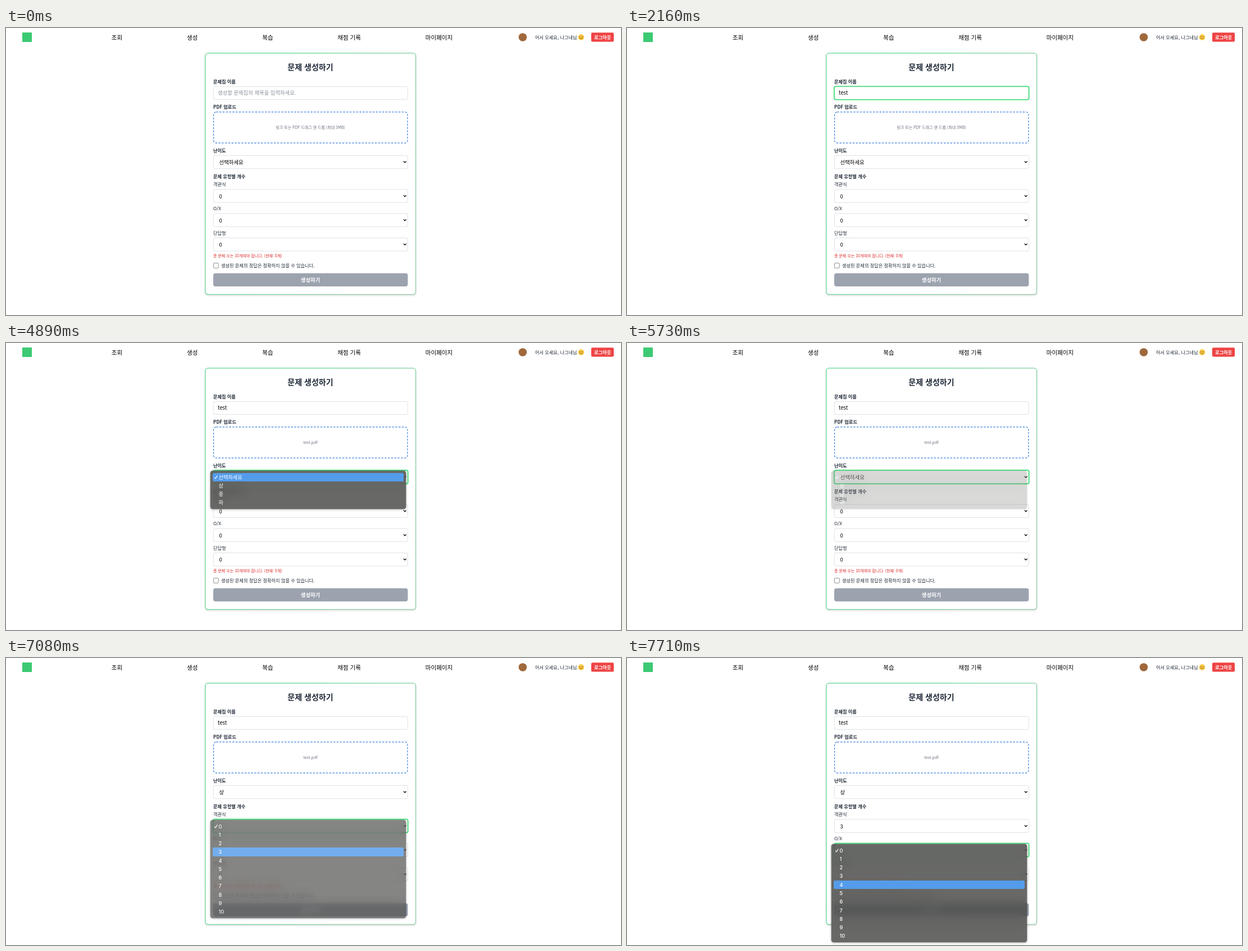
An HTML page that plays this animation: 1095x512 px, repeating every 8 s.

```html
<!DOCTYPE html>
<html lang="ko">
<head>
<meta charset="utf-8">
<title>문제 생성하기</title>
<style>
  html, body { margin: 0; width: 100%; height: 100%; overflow: hidden; background: #fff; }
  svg { position: absolute; left: 0; top: 0; }
  text { font: 8.19px "Noto Sans CJK KR", "Noto Sans CJK", sans-serif; fill: #1f2937; }
  .nav text { font-size: 10.53px; font-weight: 500; fill: #000; text-anchor: middle; }
  .title { font-size: 14.04px; font-weight: 700; text-anchor: middle; }
  .label { font-weight: 700; }
  .value { font-size: 9.36px; fill: #000; }
  .hint { font-size: 7.02px; fill: #6b7280; }
  .box { fill: #fff; stroke: #d1d5db; stroke-width: .7; }
  .ring { fill: none; stroke: #4ade80; }
  .chevron { fill: none; stroke: #000; stroke-width: 1.3; }
  #menu {
    position: absolute; left: 363.5px; width: 340px; padding: 3.5px 4px; border-radius: 4px;
    background: rgba(67, 67, 64, .8); backdrop-filter: blur(8px);
    box-shadow: 0 0 0 .5px rgba(0, 0, 0, .35), 0 1px 4px rgba(0, 0, 0, .3);
    font: 500 9.2px/15.28px Inter, "Noto Sans CJK KR", sans-serif; color: #fff;
  }
  #menu div { height: 15.28px; padding-left: 11px; border-radius: 2.5px; }
  #menu .hot { background: #549ceb; }
  #menu svg { left: 6px; top: 7px; fill: none; stroke: #fff; stroke-width: 1.1; }
</style>
</head>
<body>
<svg id="stage" width="1095" height="512" viewBox="0 0 1095 512">
  <defs>
    <linearGradient id="edge" x2="1" y2=".6">
      <stop offset=".3" stop-color="#5fd893"/><stop offset="1" stop-color="#93cdaa"/>
    </linearGradient>
    <filter id="shadow" x="-5%" y="-5%" width="110%" height="110%">
      <feDropShadow dx="0" dy="1.5" stdDeviation="1.5" flood-opacity=".14"/>
    </filter>
  </defs>

  <rect x="29" y="8" width="17" height="17" fill="#3cca74"/>
  <g class="nav">
    <text x="197.5" y="17" dy=".37em">조회</text>
    <text x="331.7" y="17" dy=".37em">생성</text>
    <text x="466" y="17" dy=".37em">복습</text>
    <text x="611" y="17" dy=".37em">채점 기록</text>
    <text x="771" y="17" dy=".37em">마이페이지</text>
  </g>
  <circle cx="920" cy="16.5" r="7.3" fill="#a0693c"/>
  <text x="942" y="16.7" dy=".37em">어서 오세요, 나그네님</text>
  <g fill="none" stroke="#6b4423" stroke-width=".8" stroke-linecap="round">
    <circle cx="1024" cy="16.4" r="5.3" fill="#fdcb45" stroke="none"/>
    <path d="M1020.8 15.6q1.1-1.6 2.2 0m2 0q1.1-1.6 2.2 0m-5.8 2.4q2.6 2.7 5.2 0"/>
  </g>
  <rect x="1042" y="8.2" width="40.2" height="16.4" rx="2.4" fill="#ef4444"/>
  <text class="label" x="1062.2" y="16.6" dy=".37em" text-anchor="middle" style="fill:#fff">로그아웃</text>

  <rect x="354.9" y="44.9" width="374.6" height="430.4" rx="4.7" fill="#fff" stroke="url(#edge)" stroke-width="1.3" filter="url(#shadow)"/>
  <text class="title" x="542" y="70" dy=".37em">문제 생성하기</text>

  <text class="label" x="369" y="96" dy=".37em">문제집 이름</text>
  <rect class="box" x="369.3" y="104.6" width="346" height="22.8" rx="2.6"/>
  <text class="value" id="name" x="377" y="116" dy=".37em"></text>
  <path id="caret" stroke="#000" stroke-width=".7" d="M.4 108.8v13.6"/>

  <text class="label" x="369" y="140.8" dy=".37em">PDF 업로드</text>
  <rect x="369.6" y="149.8" width="345.3" height="55.4" rx="4.5" fill="none" stroke="#3b7fe0" stroke-width="1.2" stroke-dasharray="3.5 2.3"/>
  <text class="hint" id="file" x="542" y="177.5" dy=".37em" text-anchor="middle"></text>

  <text class="label" x="369" y="218.8" dy=".37em">난이도</text>
  <text class="label" x="369" y="264.8" dy=".37em">문제 유형별 개수</text>
  <text x="369" y="279.2" dy=".37em">객관식</text>
  <text x="369" y="322.3" dy=".37em">O/X</text>
  <text x="369" y="365.6" dy=".37em">단답형</text>
  <g id="selects"></g>

  <text class="hint" id="total" x="369" y="406" dy=".37em" style="fill:#dc2626"></text>
  <rect x="369.4" y="419.4" width="8.8" height="8.8" rx="1.4" fill="#fff" stroke="#707070" stroke-width=".8"/>
  <text x="383" y="424.4" dy=".37em">생성된 문제의 정답은 정확하지 않을 수 있습니다.</text>
  <rect x="369" y="437.4" width="346.4" height="23.6" rx="4" fill="#9ca3af"/>
  <text class="value" x="542" y="449.4" dy=".37em" text-anchor="middle" style="fill:#fff;font-weight:700">생성하기</text>

  <g id="rings"></g>
  <g id="ghost">
    <rect x=".5" y="0" width="11" height="12.5" rx="2" fill="#eceef0"/>
    <circle cx="6.2" cy="5" r="2" fill="#8d9fbb"/>
    <rect x="11.3" y="-.5" width="35.5" height="9.8" rx="2.6" fill="#1f6bcb"/>
    <text x="14" y="4.5" dy=".34em" style="font:500 7.4px Inter,sans-serif;fill:#fff">test.pdf</text>
  </g>
</svg>
<div id="menu"></div>

<script>
const $ = id => document.getElementById(id);
const clamp = v => Math.max(0, Math.min(1, v));
const ramp = (t, from, length) => clamp((t - from) / length);
const mix = (a, b, k) => a + (b - a) * k;

const levels = ['선택하세요', '상', '중', '하'];
const counts = [...Array(11).keys()];
const selectTops = [227.4, 288, 331, 374.4];
const selectHeight = 23.4;

// hover: [time, item] pairs; the chosen value is applied 330 ms after the click
const menus = [
  { top: 228, open: 4710, click: 5580, items: levels, hover: [[4710, 0], [5070, 2], [5340, 1], [5580, -1]] },
  { top: 289, open: 6060, click: 7020, items: counts,
    hover: [[6060, 0], [6240, 1], [6270, 2], [6300, 3], [6360, 4], [6390, 5], [6570, 4], [6810, 3]] },
  { top: 332.2, open: 7500, click: 9000, items: counts,
    hover: [[7500, 0], [7620, 1], [7650, 2], [7680, 3], [7710, 4]] }
];
const focusSpans = [
  { top: 104.6, height: 22.8, spans: [[900, 2580], [4410, 4710]] },
  { top: selectTops[0], height: selectHeight, spans: [[4710, 6060]] },
  { top: selectTops[1], height: selectHeight, spans: [[6060, 7500]] },
  { top: selectTops[2], height: selectHeight, spans: [[7500, 9000]] }
];

$('selects').innerHTML = selectTops.map(y => `
  <rect class="box" x="369.3" y="${y}" width="346" height="${selectHeight}" rx="2.6"/>
  <text class="value" x="379.6" y="${y + 12.2}" dy=".37em"></text>
  <path class="chevron" d="M707.8 ${y + 10.4}l2.4 2.4 2.4-2.4"/>`).join('');
const selectTexts = $('selects').querySelectorAll('text');

$('rings').innerHTML = focusSpans.map(({ top, height }) => `<g class="ring">
  <rect x="368.7" y="${top - .6}" width="347.2" height="${height + 1.2}" rx="3.1" stroke-width="2.6" stroke-opacity=".3"/>
  <rect x="369" y="${top - .3}" width="346.6" height="${height + .6}" rx="2.9" stroke-width="1.6"/></g>`).join('');
const rings = [...$('rings').children];

const setText = (node, value) => { if (node.textContent !== value) node.textContent = value; };
let shownMenu;

function drawMenu(t) {
  const menu = menus.find(m => t >= m.open && t < m.click + 190);
  $('menu').style.display = menu ? '' : 'none';
  if (!menu) return;
  if (menu !== shownMenu) {
    $('menu').innerHTML = menu.items.map(item => `<div>${item}</div>`).join('') +
      '<svg width="9" height="9"><path d="M1 4.6l1.9 2.2L6.4 1.6"/></svg>';
    $('menu').style.top = menu.top + 'px';
    shownMenu = menu;
  }
  const hot = menu.hover.filter(([time]) => time <= t).pop()[1];
  $('menu').querySelectorAll('div').forEach((row, i) => row.classList.toggle('hot', i === hot));
  $('menu').style.opacity = 1 - ramp(t, menu.click + 30, 160);
}

function drawGhost(t) {
  const arrive = 1 - (1 - ramp(t, 3210, 330)) ** 2;
  const leave = ramp(t, 3810, 390);
  const x = mix(32, 411, arrive) + 108 * leave * (2 - leave);
  $('ghost').setAttribute('transform', `translate(${x} ${mix(108.5, 171.3, arrive)})`);
  $('ghost').style.opacity = t < 3210 ? 0 : 1 - ramp(t, 4200, 90);
}

function draw(t) {
  const typed = 'test'.slice(0, [1350, 1440, 1560, 1680].filter(time => time <= t).length);
  setText($('name'), typed || '생성할 문제집의 제목을 입력하세요.');
  $('name').style.fill = typed ? '#000' : '#8b929e';
  const caretOn = (t >= 900 && t < 2160) || (t >= 4410 && t < 4710);
  $('caret').style.opacity = +caretOn;
  const caretX = 377 + (typed ? $('name').getComputedTextLength() : 0);
  $('caret').setAttribute('transform', `translate(${caretX} 0)`);

  setText($('file'), t < 4230 ? '링크 또는 PDF 드래그 앤 드롭 (최대 3MB)' : 'test.pdf');
  const chosen = t >= 7350 ? 3 : 0;
  [levels[t >= 5910 ? 1 : 0], chosen, 0, 0].forEach((value, i) => setText(selectTexts[i], String(value)));
  setText($('total'), `총 문제 수는 10개여야 합니다. (현재: ${chosen}개)`);

  rings.forEach((ring, i) => {
    ring.style.opacity = Math.max(...focusSpans[i].spans.map(([on, off]) =>
      ramp(t, on - 30, 180) * (1 - ramp(t, off - 30, 90))));
  });
  drawGhost(t);
  drawMenu(t);
}

function tick() {
  draw(Math.floor(performance.now() % 8000 / 30) * 30);
  requestAnimationFrame(tick);
}
tick();
</script>
</body>
</html>
```
